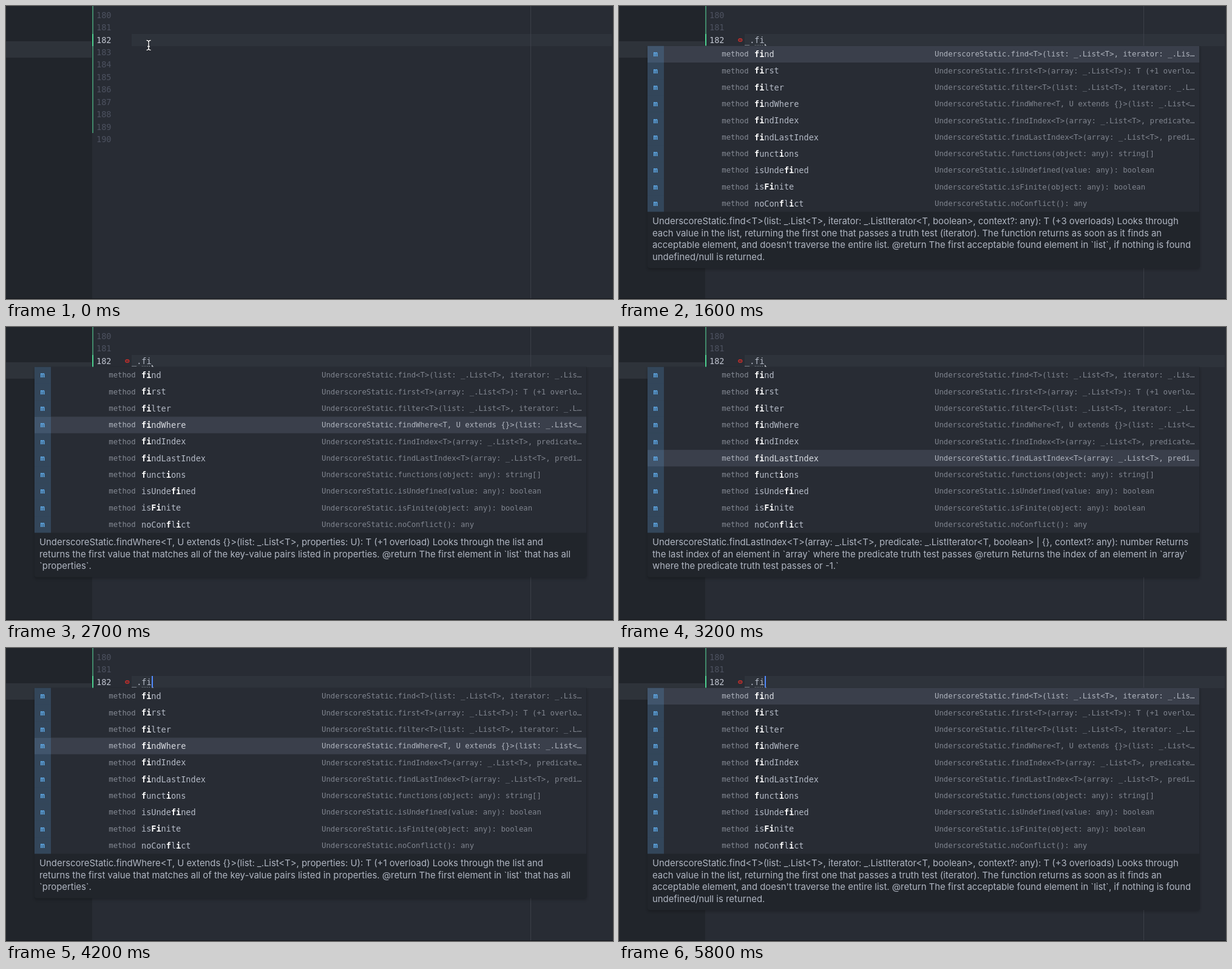
These frames come from a looping animation (1000 by 482 pixels, 6000 ms). An HTML page with a canvas:

```html
<!DOCTYPE html>
<html lang="en">
<head>
<meta charset="utf-8">
<title>Editor autocomplete</title>
<style>
  html, body { margin: 0; width: 100%; height: 100%; overflow: hidden; background: #282c34; }
  canvas { display: block; }
</style>
</head>
<body>
<canvas id="stage" width="1000" height="482"></canvas>
<script>
const ctx = document.getElementById("stage").getContext("2d");
const LOOP = 6000;
const MONO = '"DejaVu Sans Mono", monospace';
const CODE = "13.54px " + MONO;
const CODE_BOLD = "bold 13.54px " + MONO;
const SMALL = "12.27px " + MONO;
const DOC = "14.88px Inter, sans-serif";
const CHAR = 8.15;
const LINE_H = 20.42, ROW_H = 27.28, DOC_H = 19.5;
const LIST = { x: 47, y: 65.7, w: 909 };
const CODE_X = 207;

// Brackets mark the matched letters.
const items = [
  { name: "[fi]nd", sig: "find<T>(list: _.List<T>, iterator: _.Lis…",
    doc: ["find<T>(list: _.List<T>, iterator: _.ListIterator<T, boolean>, context?: any): T (+3 overloads) Looks through",
      "each value in the list, returning the first one that passes a truth test (iterator). The function returns as soon as it finds an",
      "acceptable element, and doesn't traverse the entire list. @return The first acceptable found element in `list`, if nothing is found",
      "undefined/null is returned."] },
  { name: "[fi]rst", sig: "first<T>(array: _.List<T>): T (+1 overlo…",
    doc: ["first<T>(array: _.List<T>): T (+1 overload) ******* Arrays * ******** Returns the first element of an array.",
      "Passing n will return the first n elements of the array. @return Returns the first element of `array`."] },
  { name: "[fi]lter", sig: "filter<T>(list: _.List<T>, iterator: _.L…",
    doc: ["filter<T>(list: _.List<T>, iterator: _.ListIterator<T, boolean>, context?: any): T[] (+1 overload) Looks through",
      "each value in the list, returning an array of all the values that pass a truth test (iterator). Delegates to the native filter method, if",
      "it exists. @return The filtered list of elements."] },
  { name: "[fi]ndWhere", sig: "findWhere<T, U extends {}>(list: _.List<…",
    doc: ["findWhere<T, U extends {}>(list: _.List<T>, properties: U): T (+1 overload) Looks through the list and",
      "returns the first value that matches all of the key-value pairs listed in properties. @return The first element in `list` that has all",
      "`properties`."] },
  { name: "[fi]ndIndex", sig: "findIndex<T>(array: _.List<T>, predicate…",
    doc: ["findIndex<T>(array: _.List<T>, predicate: _.ListIterator<T, boolean> | {}, context?: any): number Returns the",
      "first index of an element in `array` where the predicate truth test passes @return Returns the index of an element in `array`",
      "where the predicate truth test passes or -1.`"] },
  { name: "[fi]ndLastIndex", sig: "findLastIndex<T>(array: _.List<T>, predi…",
    doc: ["findLastIndex<T>(array: _.List<T>, predicate: _.ListIterator<T, boolean> | {}, context?: any): number Returns",
      "the last index of an element in `array` where the predicate truth test passes @return Returns the index of an element in `array`",
      "where the predicate truth test passes or -1.`"] },
  { name: "[f]unct[i]ons", sig: "functions(object: any): string[]",
    doc: ["functions(object: any): string[] Returns a sorted list of the names of every method in an object - that is to say,",
      "the name of every function property of the object. @return List of all the function names on `object`."] },
  { name: "isUnde[fi]ned", sig: "isUndefined(value: any): boolean" },
  { name: "is[Fi]nite", sig: "isFinite(object: any): boolean" },
  { name: "noCon[f]l[i]ct", sig: "noConflict(): any" }
];

const typing = [100, 300, 500, 600];
const blinks = [1000, 1300, 1600, 1800, 2100, 2400, 2700, 2900, 3200,
  3500, 3800, 4100, 4300, 4600, 4900, 5200, 5500, 5800];
const downs = [1700, 2000, 2700, 2900, 3200, 3600];
const ups = [3900, 4000, 4200, 4400, 4600, 4800];
const LINT_AT = 900, POPUP_AT = 1200;

const passed = (times, t) => times.filter(k => t >= k).length;

function rect(x, y, w, h, color) {
  ctx.fillStyle = color;
  ctx.fillRect(x, y, w, h);
}

function text(str, x, y, font, color, align = "left") {
  ctx.font = font;
  ctx.fillStyle = color;
  ctx.textAlign = align;
  ctx.fillText(str, x, y);
}

function drawEditor() {
  rect(0, 0, 1000, 482, "#282c34");
  rect(0, 0, 142, 482, "#21252b");
  rect(0, 58, 141, 27, "#2e333a");
  rect(CODE_X, 46, 791, 20, "#2e333b");
  rect(864, 0, 1, 482, "#3c4049");
  rect(142, 0, 2, 209, "#41886a");
  rect(142, 46, 2, 20, "#4ed391");
  for (let i = 0; i <= 10; i++) {
    text(String(180 + i), 149, 19.8 + i * LINE_H, CODE, i === 2 ? "#c0c5d0" : "#4d5260");
  }
  rect(0, 481, 1000, 1, "#14161b");
}

function drawMouse() {
  const beam = (width, color) => {
    ctx.strokeStyle = color;
    ctx.lineWidth = width;
    ctx.beginPath();
    ctx.moveTo(231.5, 56.5);
    ctx.quadraticCurveTo(235, 56.5, 235, 59.5);
    ctx.quadraticCurveTo(235, 56.5, 238.5, 56.5);
    ctx.moveTo(235, 59);
    ctx.lineTo(235, 70);
    ctx.moveTo(231.5, 72.5);
    ctx.quadraticCurveTo(235, 72.5, 235, 69.5);
    ctx.quadraticCurveTo(235, 72.5, 238.5, 72.5);
    ctx.moveTo(233, 66.5);
    ctx.lineTo(237, 66.5);
    ctx.stroke();
  };
  beam(3, "#15171c");
  beam(1.4, "#ffffff");
}

function drawLint() {
  ctx.strokeStyle = "#c42f2b";
  ctx.lineWidth = 1.5;
  ctx.beginPath();
  ctx.ellipse(199.8, 56, 2.9, 2.3, 0, 0, Math.PI * 2);
  ctx.stroke();
  rect(199, 55.4, 1.6, 1.2, "#c42f2b");
  for (let x = 224; x < 239; x += 3) rect(x, 64, 1, 1, "#a0a6b2");
  ctx.fillStyle = "#c9cdd5";
  ctx.beginPath();
  ctx.moveTo(240, 62);
  ctx.lineTo(243.5, 65.7);
  ctx.lineTo(240, 65.7);
  ctx.fill();
}

function drawCode(t) {
  const count = passed(typing, t);
  text("_.fi".slice(0, count), CODE_X, 60.6, CODE, "#b4bac6");
  if (t >= LINT_AT) drawLint();
  if (count && passed(blinks, t) % 2 === 0) {
    rect(Math.round(CODE_X + count * CHAR), 46, 2, 19, "#528bff");
  }
}

function drawName(name, y, color) {
  let x = 223;
  let bold = false;
  for (const ch of name) {
    if (ch === "[" || ch === "]") {
      bold = ch === "[";
      continue;
    }
    text(ch, x, y, bold ? CODE_BOLD : CODE, bold ? "#ffffff" : color);
    x += CHAR;
  }
}

function drawRow(item, i, active) {
  const top = LIST.y + i * ROW_H;
  const base = top + 17.7;
  if (active) rect(LIST.x, top, LIST.w, ROW_H, "#3a3f4b");
  rect(LIST.x, top, 27, ROW_H, "rgba(97, 175, 239, 0.2)");
  text("m", 60.3, base, "bold 12.27px " + MONO, "#61afef", "center");
  text("method", 169.3, base, SMALL, active ? "#b0b5bf" : "#858a94");
  drawName(item.name, base + 0.7, active ? "#d7dae0" : "#b4bac6");
  text("UnderscoreStatic." + item.sig, 520, base, SMALL, active ? "#b0b5bf" : "#80858f");
}

function drawPopup(t) {
  const selected = passed(downs, t) - passed(ups, t);
  const doc = items[selected].doc;
  const listH = ROW_H * items.length;
  const docY = LIST.y + listH;

  ctx.save();
  ctx.shadowColor = "rgba(0, 0, 0, 0.2)";
  ctx.shadowBlur = 4;
  ctx.shadowOffsetY = 3;
  ctx.fillStyle = "#21252b";
  ctx.beginPath();
  ctx.roundRect(LIST.x, LIST.y, LIST.w + 1, listH + 14.5 + doc.length * DOC_H, [0, 0, 4, 4]);
  ctx.fill();
  ctx.restore();

  rect(LIST.x, LIST.y, LIST.w, listH, "#282c34");
  items.forEach((item, i) => drawRow(item, i, i === selected));

  doc.forEach((line, i) => {
    const prefix = i ? "" : "UnderscoreStatic.";
    text(prefix + line, 55, docY + 20.8 + i * DOC_H, DOC, "#b0b6c2");
  });
}

function draw() {
  const t = performance.now() % LOOP;
  drawEditor();
  drawCode(t);
  if (t < typing[0]) drawMouse();
  if (t >= POPUP_AT) drawPopup(t);
  requestAnimationFrame(draw);
}

draw();
</script>
</body>
</html>
```
